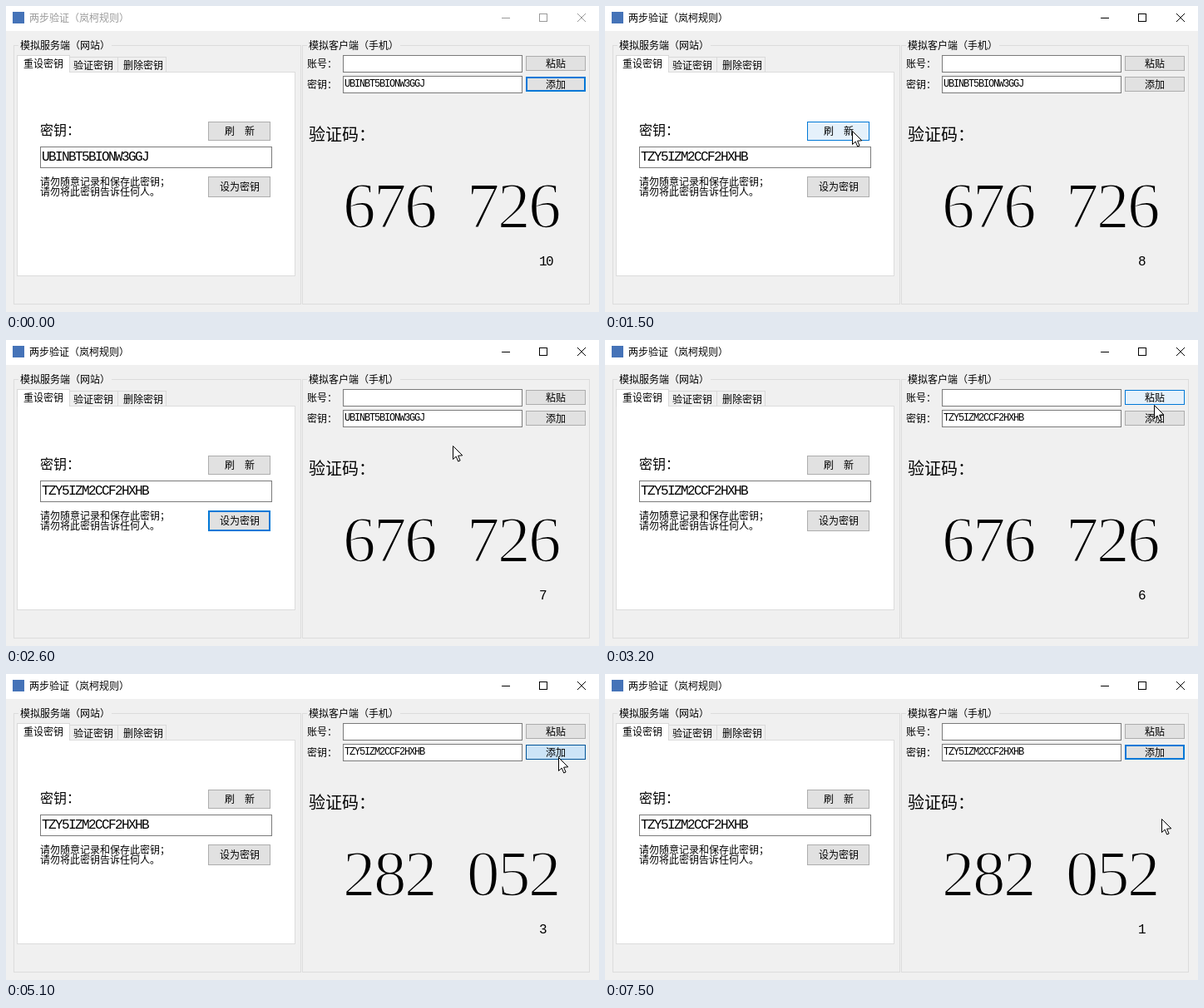
An HTML page with a canvas for the animation above (8 s loop, 713 by 368 pixels).

```html
<!DOCTYPE html>
<html lang="zh-CN">
<head>
<meta charset="utf-8">
<style>
html, body { margin: 0; width: 100%; height: 100%; overflow: hidden; background: #f0f0f0; }
canvas { display: block; }
</style>
</head>
<body>
<canvas id="stage" width="713" height="368"></canvas>
<script>
const ctx = document.getElementById('stage').getContext('2d');
const LOOP = 8000, STEP = 100;
const CJK = '"Noto Sans CJK SC", "Noto Sans CJK", sans-serif';
const MONO = '"Liberation Mono", monospace';
const SERIF = '"Liberation Serif", serif';
const GREY = '#f0f0f0';
const OLD_KEY = 'UBINBT5BIONW3GGJ', NEW_KEY = 'TZY5IZM2CCF2HXHB';
const KEY_BOX = [41, 169, 279, 26];

const buttons = [
  { label: '刷　新', box: [243, 139, 75, 23], presses: [1300] },
  { label: '设为密钥', box: [243, 205, 75, 25], presses: [2100] },
  { label: '粘贴', box: [625, 60, 72, 18], presses: [3000] },
  { label: '添加', box: [625, 85, 72, 18], presses: [-1000, 3800, 5100, 5900] }
];
const [refresh, , paste, add] = buttons;

// Pointer moves: when each one starts and where it leads
const entry = { x: 700, y: 262 };
const moves = [
  { at: 600, x: 306, y: 167 },
  { at: 1100, x: 297, y: 150 },
  { at: 1500, x: 293, y: 224 },
  { at: 2400, x: 660, y: 78 },
  { at: 3600, x: 661, y: 97 },
  { at: 3900, x: 663, y: 133 },
  { at: 4300, x: 664, y: 100 },
  { at: 5200, x: 665, y: 117 },
  { at: 5600, x: 665, y: 101 },
  { at: 6000, x: 669, y: 174 }
];

// Longer moves take longer; each one slows down towards its end
function pointerAt(t) {
  const i = moves.filter(m => m.at <= t).length - 1;
  if (i < 0) return null;
  const from = moves[i - 1] || entry, to = moves[i];
  const time = 140 + 0.85 * Math.hypot(to.x - from.x, to.y - from.y);
  const rest = 1 - Math.min(1, (t - to.at) / time);
  const mix = k => Math.round(to[k] + (from[k] - to[k]) * rest * rest);
  return { x: mix('x'), y: mix('y') };
}

function countAt(t) {
  // Adding a key rereads the clock, which is ahead of the timer until its next tick
  const ahead = t >= 4000 && t < 5600 ? 1 : 0;
  return 9 - Math.floor((t - 75) / 925) - ahead;
}

const lastPress = (b, t) => Math.max(...b.presses.filter(p => p <= t));
const focusAt = t => buttons.reduce((a, b) => lastPress(b, t) > lastPress(a, t) ? b : a);

function inside(p, [x, y, w, h], pad = 0) {
  return p && p.x >= x - pad && p.x <= x + w + pad && p.y >= y - pad && p.y <= y + h + pad;
}

function fill(color, x, y, w, h) {
  ctx.fillStyle = color;
  ctx.fillRect(x, y, w, h);
}

function panel([x, y, w, h], back, edge, line = 1) {
  fill(edge, x, y, w, h);
  fill(back, x + line, y + line, w - 2 * line, h - 2 * line);
}

function text(str, x, y, font, color = '#000', spacing = 0) {
  ctx.font = font;
  ctx.letterSpacing = spacing + 'px';
  ctx.fillStyle = color;
  ctx.fillText(str, x, y);
}

// Chinese text, placed by its vertical centre
function zh(str, x, cy, size = 12, color) {
  text(str, x, Math.round(cy + size * 0.38), size + 'px ' + CJK, color);
}

// Tight monospace, half an em per letter
function mono(str, x, y, size) {
  text(str, x, y, size + 'px ' + MONO, '#000', -size / 10);
}

// Large serif digits, thinned by an outline in the background colour
function digits(str, x, y) {
  text(str, x, y, '79px ' + SERIF, '#000', -2.5);
  ctx.strokeStyle = GREY;
  ctx.lineWidth = 1.8;
  ctx.strokeText(str, x, y);
}

function titleBar(active) {
  const ink = active ? '#000' : '#999';
  fill('#fff', 0, 0, 713, 30);
  fill('#4573b8', 8, 7, 14, 14);
  zh('两步验证（岚柯规则）', 28, 14, 12, ink);
  fill(ink, 596, 14, 10, 1);
  panel([641, 9, 10, 10], '#fff', ink);
  ctx.strokeStyle = ink;
  ctx.lineWidth = 1;
  ctx.beginPath();
  ctx.moveTo(687, 9);
  ctx.lineTo(697, 19);
  ctx.moveTo(697, 9);
  ctx.lineTo(687, 19);
  ctx.stroke();
}

function group(title, x) {
  panel([x, 47, 346, 312], GREY, '#dcdcdc');
  fill(GREY, x + 6, 46, 112, 3);
  zh(title, x + 8, 47);
}

function tabs() {
  panel([76, 61, 59, 19], GREY, '#d9d9d9');
  panel([134, 61, 59, 19], GREY, '#d9d9d9');
  panel([13, 79, 335, 246], '#fff', '#dcdcdc');
  panel([13, 59, 64, 21], '#fff', '#d9d9d9');
  fill('#fff', 14, 78, 62, 3);
  zh('重设密钥', 21, 69);
  zh('验证密钥', 81, 71);
  zh('删除密钥', 141, 71);
}

function button(b, t, pointer, focused) {
  const [x, y, w, h] = b.box;
  if (t - lastPress(b, t) < STEP) panel(b.box, '#cce4f7', '#005499');
  else if (inside(pointer, b.box)) panel(b.box, '#e5f1fb', '#0078d7');
  else if (focused) panel(b.box, '#e1e1e1', '#0078d7', 2);
  else panel(b.box, '#e1e1e1', '#adadad');
  zh(b.label, x + Math.round((w - b.label.length * 12) / 2), y + h / 2);
}

function arrow({ x, y }) {
  ctx.save();
  ctx.translate(x + 0.5, y + 0.5);
  ctx.beginPath();
  [[0, 0], [0, 16], [3.7, 12.6], [6.2, 18.5], [8.6, 17.5], [6.1, 11.7], [11.3, 11.3]]
    .forEach(p => ctx.lineTo(...p));
  ctx.closePath();
  ctx.fillStyle = '#fff';
  ctx.fill();
  ctx.strokeStyle = '#000';
  ctx.lineWidth = 1;
  ctx.stroke();
  ctx.restore();
}

function server(t, pointer) {
  group('模拟服务端（网站）', 9);
  tabs();
  zh('密钥：', 41, 149, 16);
  panel(KEY_BOX, '#fff', inside(pointer, KEY_BOX, 3) ? '#171717' : '#7a7a7a');
  mono(t < refresh.presses[0] + 200 ? OLD_KEY : NEW_KEY, 43, 186, 16);
  zh('请勿随意记录和保存此密钥；', 41, 211);
  zh('请勿将此密钥告诉任何人。', 41, 223);
}

function client(t) {
  group('模拟客户端（手机）', 356);
  zh('账号：', 362, 69);
  zh('密钥：', 362, 94);
  panel([405, 59, 216, 21], '#fff', '#7a7a7a');
  panel([405, 84, 216, 21], '#fff', '#7a7a7a');
  mono(t < paste.presses[0] + STEP ? OLD_KEY : NEW_KEY, 407, 97, 12);
  zh('验证码：', 364, 154, 20);
  const [left, right] = t < add.presses[1] + STEP ? ['676', '726'] : ['282', '052'];
  digits(left, 405, 266);
  digits(right, 554, 266);
  mono(String(countAt(t)), 641, 312, 16);
}

function draw(t) {
  const pointer = pointerAt(t), focus = focusAt(t);
  fill(GREY, 0, 0, 713, 368);
  titleBar(t >= refresh.presses[0]);
  server(t, pointer);
  client(t);
  buttons.forEach(b => button(b, t, pointer, b === focus));
  if (pointer) arrow(pointer);
}

function tick(now) {
  draw(Math.floor((now % LOOP) / STEP) * STEP);
  requestAnimationFrame(tick);
}
requestAnimationFrame(tick);
</script>
</body>
</html>
```
